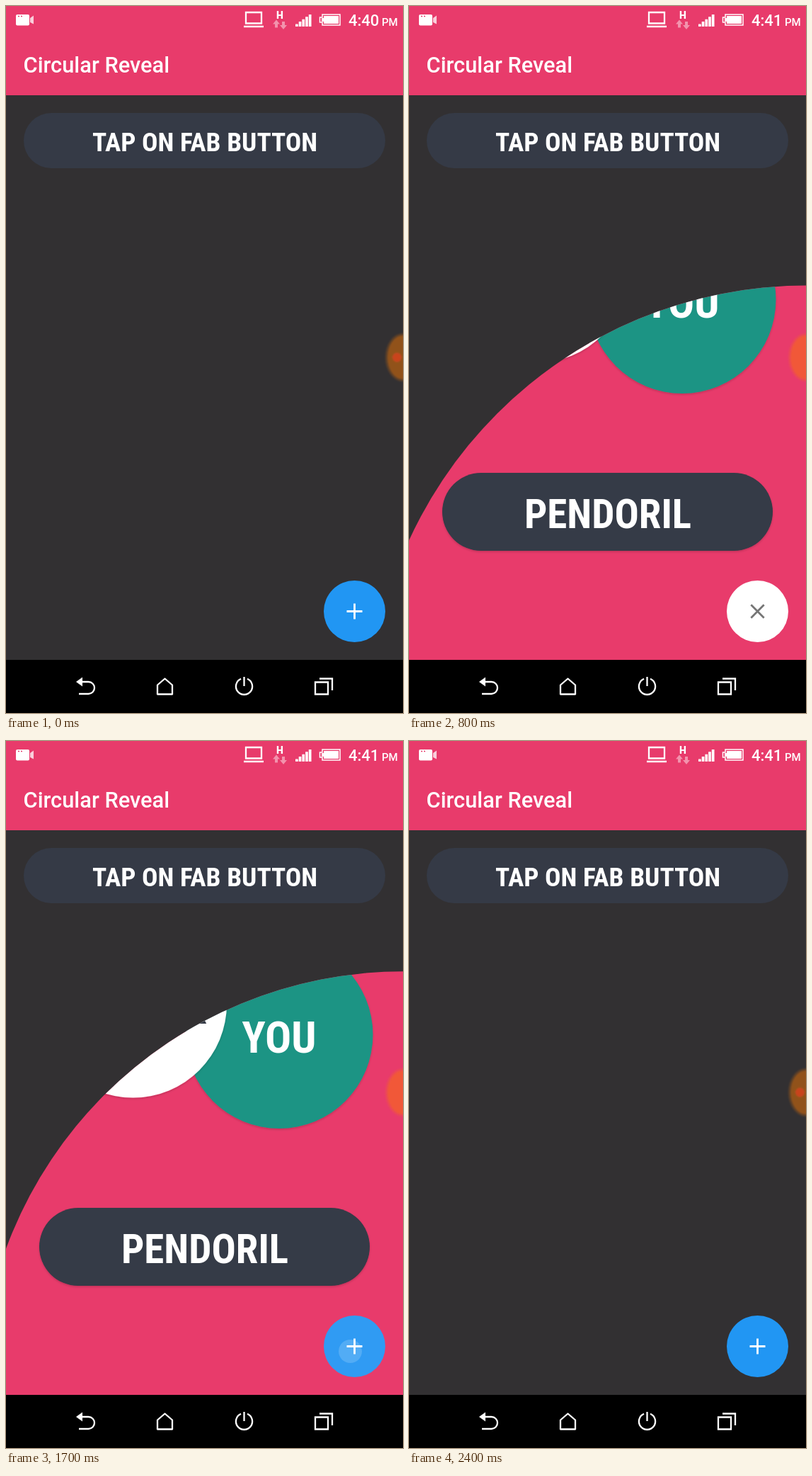
An HTML page that plays this animation: 561 by 998 pixels, repeating every 2500 ms.

```html
<!DOCTYPE html>
<html lang="en">
<head>
<meta charset="utf-8">
<title>Circular Reveal</title>
<style>
  html, body { margin: 0; width: 100%; height: 100%; overflow: hidden; background: #323032; }
  svg { display: block; width: 100%; height: 100%; }
  text { font-family: Roboto, sans-serif; font-weight: 500; fill: #fff; }
  .label { font-family: "Roboto Condensed", Roboto, "Open Sans", sans-serif; font-stretch: 75%; font-weight: 700; text-anchor: middle; }
  .line { fill: none; stroke: #fff; stroke-width: 2.3; }
</style>
</head>
<body>
<svg viewBox="0 0 561 998">
  <defs>
    <clipPath id="reveal"><circle id="hole" cx="561" cy="923" r="0"/></clipPath>
    <filter id="shadow" x="-10%" y="-10%" width="120%" height="125%">
      <feDropShadow dx="0" dy="1.5" stdDeviation="1.6" flood-color="#000" flood-opacity=".18"/>
    </filter>
    <filter id="soft" x="-20%" y="-20%" width="140%" height="140%"><feGaussianBlur stdDeviation=".8"/></filter>
  </defs>

  <rect width="561" height="998" fill="#323032"/>
  <rect x="25" y="151" width="511" height="78" rx="39" fill="#353a46"/>
  <text class="label" x="281" y="205" font-size="37.3">TAP ON FAB BUTTON</text>

  <g clip-path="url(#reveal)">
    <rect y="126" width="561" height="797" fill="#e83b6b"/>
    <circle cx="386" cy="414.5" r="132.5" fill="#1e9484" filter="url(#shadow)"/>
    <text class="label" x="386" y="439.5" font-size="61.8">YOU</text>
    <circle cx="179.5" cy="371" r="132.5" fill="#fff" filter="url(#shadow)"/>
    <text class="label" x="180" y="398.5" font-size="70.3" style="fill:#353a46">THANK</text>
    <rect x="47" y="659" width="467" height="110" rx="55" fill="#353a46" filter="url(#shadow)"/>
    <text class="label" x="281" y="736.5" font-size="57">PENDORIL</text>
  </g>

  <rect width="561" height="126" fill="#e83b6b"/>
  <text x="24.6" y="94" font-size="30.8">Circular Reveal</text>

  <g id="status">
    <rect x="14" y="12" width="19" height="15.5" rx="2" fill="#fff"/>
    <path d="M34 17L39 13.5V25.5L34 23Z" fill="#fff" opacity=".75"/>
    <path d="M17 14.5h2m2 0h2" stroke="#e83b6b" stroke-width="1.6"/>
    <path class="line" d="M339 9H361V24.5H339ZM336 29H364"/>
    <text x="387" y="18" font-size="14" text-anchor="middle" style="font-weight:900">H</text>
    <path d="M382 19.5l5 6h-3v5h-4v-5h-3ZM392 33l5-6h-3v-5h-4v5h-3Z" fill="#fff" opacity=".45"/>
    <path id="signal" fill="#fff"/>
    <path class="line" style="stroke-width:1.5" d="M447 12H472V27H447V23H443.5V16H447Z"/>
    <path d="M449 14H470V25H449V22H446V17H449Z" fill="#fff"/>
    <text id="clock" x="484" y="28" font-size="22">4:40</text>
    <text x="531" y="28" font-size="15">PM</text>
  </g>

  <g transform="translate(492.5 854.5)">
    <circle id="fab" r="43.5"/>
    <circle id="touch" r="16.5" stroke-width="2.5"/>
    <path id="icon" d="M-11 0H11M0-11V11" stroke-width="2.8" vector-effect="non-scaling-stroke"/>
  </g>

  <g filter="url(#soft)">
    <ellipse cx="561" cy="496" rx="25" ry="34" fill="#fb7809" opacity=".2"/>
    <ellipse cx="561" cy="496" rx="22" ry="31" fill="#fb7809" opacity=".34"/>
    <circle id="dot" cx="552.5" cy="496" r="6.5" fill="#dc401a"/>
  </g>

  <rect y="923" width="561" height="75" fill="#000"/>
  <path d="M99 954l9-6.5v13Z" fill="#fff"/>
  <path class="line" d="M106 954H116.500a8.500 8.500 0 0 1 0 17H103"/>
  <path class="line" stroke-linejoin="round" d="M214 958.5L224.5 949.5 235 958.5V971.5H214Z"/>
  <path class="line" d="M332 949.7a11.6 11.6 0 1 0 9 0M336.500 947V960"/>
  <path class="line" d="M437 954.5H455V971.5H437ZM443 949.5H461V966"/>
</svg>
<script>
  const LOOP = 2500, STEP = 100, SPEED = 300;
  const OPEN_AT = 633, CLOSE_AT = 1600;
  const OPEN = { cy: 1012, radius: 1049 };
  const CLOSE = { cy: 923, radius: 797 };
  const $ = id => document.getElementById(id);
  const set = (id, attrs) => {
    for (const key in attrs) $(id).setAttribute(key, attrs[key]);
  };
  const ease = (t, start) => {
    const p = Math.min(1, Math.max(0, (t - start) / SPEED));
    return (1 - Math.cos(Math.PI * p)) / 2;
  };

  $("signal").setAttribute("d", [0, 1, 2, 3, 4].map(i => {
    const height = 3.5 + 3.4 * i;
    return `M${409 + 4.7 * i} ${29 - height}h3.7v${height}h-3.7Z`;
  }).join(""));

  // A finger rests on the button for two steps around each tap.
  function touchAt(t) {
    const near = start => Math.abs(t - start) < STEP;
    if (near(OPEN_AT)) return { cx: -22, cy: -6 };
    if (near(CLOSE_AT + STEP / 2)) return { cx: -6, cy: 7 };
    return null;
  }

  function draw(time) {
    const t = Math.floor(time % LOOP / STEP) * STEP;
    const closing = t > CLOSE_AT;
    const { cy, radius } = closing ? CLOSE : OPEN;
    const progress = closing ? 1 - ease(t, CLOSE_AT) : ease(t, OPEN_AT);
    const opened = t > OPEN_AT && !closing;
    const r = radius * progress;
    set("hole", { cy, r });

    const touch = touchAt(t);
    const blue = touch ? "#309bf3" : "#2196f3";
    set("fab", { fill: opened ? "#fff" : blue });
    set("icon", {
      stroke: opened ? "#757575" : "#fff",
      transform: `rotate(${opened ? 45 : 0}) scale(${opened ? 1.18 : 1})`
    });
    set("touch", {
      ...touch,
      opacity: touch ? 1 : 0,
      fill: opened ? "none" : "#ffffff2a",
      stroke: opened ? "#eae3e8" : "none"
    });

    const covered = r > cy - 496;
    set("dot", { opacity: covered ? 0 : .75 });
    $("clock").textContent = t < 300 ? "4:40" : "4:41";
  }

  const begin = performance.now();
  function frame() {
    draw(performance.now() - begin);
    requestAnimationFrame(frame);
  }
  frame();
</script>
</body>
</html>
```
